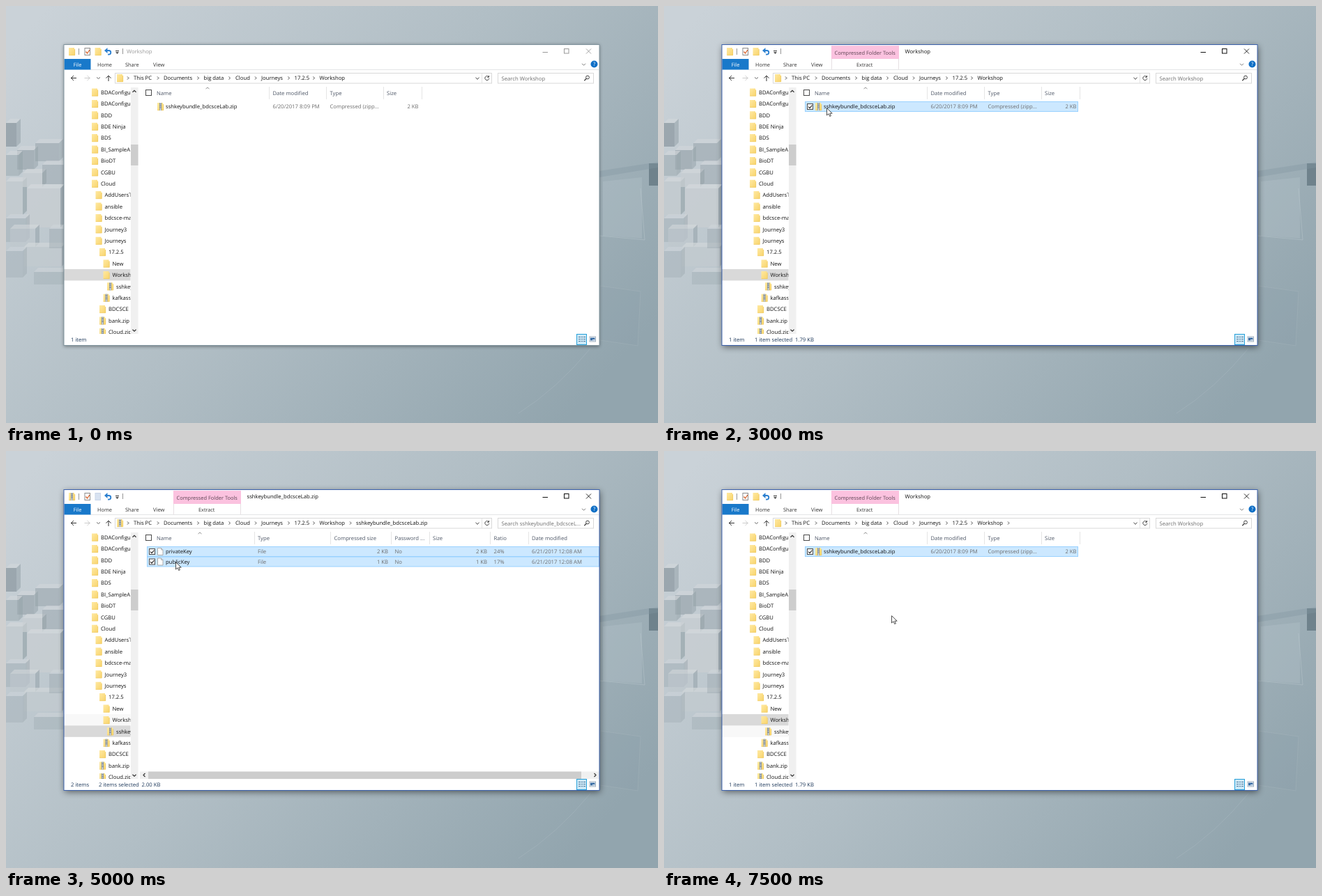
An HTML page that plays this animation: 935x599 px, repeating every 8000 ms.

```html
<!DOCTYPE html>
<html lang="en">
<head>
<meta charset="utf-8">
<title>File explorer</title>
<style>
  html, body { margin: 0; width: 100%; height: 100%; overflow: hidden; }
  svg { display: block; width: 935px; height: 599px; }
  text { font-family: "Open Sans", "Noto Sans", sans-serif; text-rendering: geometricPrecision; white-space: pre; }
</style>
</head>
<body>
<svg id="stage" viewBox="0 0 935 599" xmlns="http://www.w3.org/2000/svg">
  <defs>
    <linearGradient id="sky" gradientUnits="userSpaceOnUse" x1="60" y1="0" x2="760" y2="640">
      <stop offset="0" stop-color="#cad2d8"/>
      <stop offset=".5" stop-color="#b1bec5"/>
      <stop offset="1" stop-color="#92a5ae"/>
    </linearGradient>
    <linearGradient id="folder" x1="0" y1="0" x2="1" y2="1">
      <stop offset="0" stop-color="#ffe9a2"/>
      <stop offset="1" stop-color="#f8d46c"/>
    </linearGradient>
    <filter id="blurOn" x="-10%" y="-10%" width="120%" height="120%"><feGaussianBlur stdDeviation="5"/></filter>
    <filter id="blurOff" x="-10%" y="-10%" width="120%" height="120%"><feGaussianBlur stdDeviation="2.5"/></filter>
    <filter id="soft"><feGaussianBlur stdDeviation=".7"/></filter>
    <clipPath id="treeClip"><rect x="83" y="116" width="95.5" height="355"/></clipPath>
  </defs>
  <rect width="935" height="599" fill="url(#sky)"/>
  <g id="scenery" filter="url(#soft)"></g>
  <g id="window"></g>
  <path id="cursor" d="M.5 .7V11L3 8.8 4.7 12.5 6.4 11.8 4.8 8.2H8.2Z" fill="#fff" stroke="#222" stroke-width=".8"/>
</svg>
<script>
const LOOP = 8000;
const $ = id => document.getElementById(id);

// Drawing helpers
const rect = (x, y, w, h, fill, stroke) =>
  `<rect x="${x}" y="${y}" width="${w}" height="${h}" fill="${fill}"${stroke ? ` stroke="${stroke}"` : ''}/>`;
const line = (d, color = '#444', width = 1) =>
  `<path d="${d}" fill="none" stroke="${color}" stroke-width="${width}"/>`;
const text = (x, mid, str, color = '#111', size = 7.7, anchor = 'start') =>
  `<text x="${x}" y="${mid + 2.7}" fill="${color}" font-size="${size}" text-anchor="${anchor}">${str}</text>`;
const chevron = (x, y, dx, dy, color = '#444', width = 1) => dx
  ? line(`M${x - dx / 2} ${y - 2}l${dx} 2l${-dx} 2`, color, width)
  : line(`M${x - 2.5} ${y - dy / 2}l2.5 ${dy}l2.5 ${-dy}`, color, width);

const folder = (x, y, faded) => faded
  ? rect(x + .5, y + .5, 7.5, 10, '#d8e2f1', '#c9d5e8')
  : `<path d="M${x} ${y}h8v2h1v9h-9z" fill="url(#folder)"/>` +
    line(`M${x + .3} ${y + 10.7}h8.4V${y + 2}`, '#ecc65c', .6);
const zip = (x, y) => folder(x, y) + rect(x + 3, y, 3, 11, '#8d99a3') +
  line(`M${x + 4.5} ${y}v11`, '#e9eef2', 1) +
  line(`M${x + 3} ${y + 2}h3m-3 2.5h3m-3 2.5h3`, '#55626e', .7);
const page = (x, y) =>
  `<path d="M${x + .5} ${y + .5}h5l2.5 2.5v7.5h-7.5z" fill="#fff" stroke="#9a9a9a" stroke-width=".8"/>` +
  line(`M${x + 5.5} ${y + .5}v2.5h2.5`, '#9a9a9a', .7);
const checkbox = (x, y, on) => rect(x + .5, y + .5, 8, 8, '#fff', '#4a4a4a') +
  (on ? line(`M${x + 2} ${y + 4.6}l2 2l3.4 -4`, '#222', 1.1) : '');

function scenery() {
  // [x, y, width, height, shade, alpha]
  const cubes = [
    [0, 168, 15, 34, '#7f8d95', .6], [16, 207, 24, 28, '#8e9ba2', .55], [42, 197, 34, 26, '#93a0a7', .5],
    [0, 214, 18, 30, '#a1adb4', .6], [0, 252, 24, 48, '#c3cacf', .7], [24, 240, 28, 20, '#c8ced2', .7],
    [52, 228, 31, 28, '#9aa6ad', .5], [30, 262, 48, 56, '#c8ced2', .75], [0, 305, 28, 34, '#9eabb2', .45],
    [6, 320, 36, 26, '#c0c8cd', .6], [26, 346, 54, 28, '#c3cbcf', .65], [0, 352, 24, 38, '#a0adb3', .4],
    [40, 382, 42, 18, '#a3b0b6', .45], [62, 320, 21, 28, '#9da9b0', .45]
  ];
  const block = ([x, y, w, h, c, a]) => `<g opacity="${a}">` + rect(x, y, w, h, c) +
    `<path d="M${x} ${y}l6 -6h${w}l-6 6z" fill="#d3d8db"/>` +
    `<path d="M${x + w} ${y}l6 -6v${h}l-6 6z" fill="#98a5ac"/></g>`;
  const right = rect(922, 226, 13, 32, '#6f828c') +
    `<path d="M851 237L935 224V232L851 246Z" fill="#8295a0" opacity=".35"/>` +
    `<path d="M856 252L912 246V334L856 330Z" fill="#b2c0c7" opacity=".4"/>` +
    `<path d="M851 330L916 336L910 262" fill="none" stroke="#bac7cd" opacity=".5"/>` +
    `<path d="M852 402L910 410L906 488L852 480Z" fill="#8da0aa" opacity=".25" stroke="#b0bec5"/>`;
  const arcs = line('M735 585Q790 550 838 492', 'rgba(190,203,210,.25)', 1);
  return cubes.map(block).join('') + right + arcs;
}

const TREE = [
  [0, 'BDAConfigu'], [0, 'BDAConfigu'], [0, 'BDD'], [0, 'BDE Ninja'], [0, 'BDS'], [0, 'BI_SampleA'],
  [0, 'BioDT'], [0, 'CGBU'], [0, 'Cloud'], [1, 'AddUsersT'], [1, 'ansible'], [1, 'bdcsce-ma'],
  [1, 'Journey3'], [1, 'Journeys'], [2, '17.2.5'], [3, 'New'], [3, 'Worksho'], [4, 'sshkey', 1],
  [3, 'kafkassl', 1], [2, 'BDCSCE'], [2, 'bank.zip', 1], [2, 'Cloud.zip', 1]
];
const CRUMBS = [[183, 'This PC'], [226, 'Documents'], [283.5, 'big data'], [329, 'Cloud'],
  [366, 'Journeys'], [413.5, '17.2.5'], [449.5, 'Workshop']];
const CRUMB_ARROWS = [175, 218, 275.5, 320.5, 358, 405.5, 441.5];
const GREY = '#6d6d6d', HEAD = '#4d5666', NAVY = '#1e395b';
const BUNDLE = 'sshkeybundle_bdcsceLab.zip';

function tree(s) {
  const step = 16.4, rowY = i => 378 + (i - 16) * step;
  const mark = s.zip ? 17 : 16;
  let out = '<g clip-path="url(#treeClip)">';
  if (s.visited) out += rect(83, rowY(33 - mark), 96, step, '#f8f8f8');
  out += rect(83, rowY(mark), 96, step, '#d9d9d9');
  TREE.forEach(([level, name, packed], i) => {
    const y = 124 + i * step, x = 123 + level * 5.5;
    out += (packed ? zip : folder)(x, y - 5.5) + text(x + 13, y, name);
  });
  return out + '</g>' + rect(179, 117, 10.5, 354, '#f0f0f0') + rect(179, 199, 10.5, 30, '#cdcdcd') +
    chevron(184, 122.5, 0, -2.5, '#333', 1.2) + chevron(184, 466, 0, 2.5, '#333', 1.2);
}

function titleBar(s) {
  const ink = s.active ? '#111' : '#999';
  let out = (s.zipIcon ? zip : folder)(90, 60) + line('M104.5 61v9M167.5 61v8', '#8a8a8a', .9) +
    rect(113, 60.5, 7.5, 10, '#fff', '#8b8b8b') + line('M114.5 65.5l2 2.5l3.5 -5', '#d9622b', 1.3) +
    folder(127.5, 60, s.greyNew) +
    line('M143 64h4.5a2.8 2.8 0 0 1 0 5.6h-1.5', '#2a7fd0', 1.8) +
    '<path d="M141 64l4.5-4v8z" fill="#2a7fd0"/>' +
    line('M157 64.5h5', '#333', 1) + '<path d="M157 66.3h5l-2.5 2.5z" fill="#333"/>';
  if (s.active) {
    out += rect(240, 57, 97, 19, '#fbc2df') + line('M240.5 76v15.5M336.5 76v15.5', '#e6e0e3') +
      text(244.5, 67, 'Compressed Folder Tools', '#5d4353', 7.45) + text(276, 84, 'Extract', '#333', 7.3) +
      text(345.5, 65.5, s.zip ? BUNDLE : 'Workshop');
  } else {
    out += text(173, 65.5, 'Workshop', '#999');
  }
  out += line('M769.5 66.5h7.5', ink) + rect(800.5, 61.5, 6.5, 6.5, 'none', ink) +
    line('M832 61.5l7 7m0 -7l-7 7', ink, .9);
  return out;
}

function ribbon() {
  return line('M121 91.5H850', '#e4e5e6') + rect(83.5, 76, 38, 15.5, '#1979ca') +
    text(102.5, 84, 'File', '#fff', 7.4, 'middle') + text(131, 84, 'Home', '#333', 7.4) +
    text(171, 84, 'Share', '#333', 7.4) + text(211, 84, 'View', '#333', 7.6) +
    chevron(828.5, 84, 0, 2.5, '#777') +
    '<circle cx="843.5" cy="83.5" r="5" fill="#0f6fc6"/>' + text(843.5, 83.6, '?', '#fff', 7.5, 'middle');
}

function addressBar(s) {
  let out = line('M93 103.5h8m-4 -3.5l-3.7 3.5l3.7 3.5', '#333') +
    line('M112.5 103.5h8m-4 -3.5l3.7 3.5l-3.7 3.5', '#ccc') + chevron(132.5, 103.5, 0, 2, '#666') +
    line('M147 108v-8m-3.5 3.7l3.5 -3.7l3.5 3.7', '#333') +
    rect(156.5, 96.5, 540, 14.5, '#fff', '#d9d9d9') + line('M682.5 97v14', '#e2e2e2') +
    (s.zipIcon ? zip : folder)(159, 98);
  if (s.hover) {
    const [x, w, split] = s.hover;
    out += rect(x + .5, 97.5, w - 1, 13, '#e5f3ff', '#cfe8fb') + line(`M${x + split} 97v14`, '#cfe8fb');
  }
  CRUMB_ARROWS.forEach(x => out += chevron(x, 103.5, 2, 0));
  CRUMBS.forEach(([x, name]) => out += text(x, 103.3, name));
  if (s.zip || s.tailArrow) out += chevron(494, 103.5, 2, 0);
  if (s.zip) out += text(502, 103.3, BUNDLE);
  return out + chevron(676, 104, 0, 2.8) +
    line('M692 101.5a3 3 0 1 0 .8 2.5M692.5 100v2.3h-2.3', '#444') +
    rect(705.5, 96.5, 137, 14.5, '#fff', '#d9d9d9') +
    text(710.5, 103.8, s.zip ? 'Search sshkeybundle_bdcsceL...' : 'Search Workshop', GREY) +
    '<circle cx="834" cy="102.5" r="2.4" fill="none" stroke="#444"/>' + line('M832.3 104.3l-3 3', '#444', 1.3);
}

function header(columns, dividers, caret) {
  return checkbox(200, 120, false) + chevron(caret, 118, 0, -2, '#777', .8) +
    columns.map(([x, name]) => text(x, 125, name, HEAD)).join('') +
    line(dividers.map(x => `M${x + .5} 116v18`).join(''), '#e5e5e5');
}

// mode: 0 plain, 1 hovered, 2 selected
function row(y, right, mode, icon, cells) {
  let out = '';
  if (mode === 1) out += rect(202, y, right - 202, 14.5, '#e5f3ff');
  if (mode === 2) out += rect(202.5, y + .5, right - 203, 14, '#cce8ff', '#99d1ff');
  if (mode) out += checkbox(205, y + 3, mode === 2);
  out += icon(217, y + 2);
  cells.forEach(([x, str, anchor], i) => out += text(x, y + 7.5, str, i ? GREY : '#111', 7.7, anchor));
  return out;
}

function list(s) {
  if (!s.zip) {
    return header([[216, 'Name'], [382.5, 'Date modified'], [464.5, 'Type'], [546, 'Size']],
        [377, 459, 541, 596], 289) +
      row(137, 594, s.rows[0], zip, [[229, BUNDLE], [382.5, '6/20/2017 8:09 PM'],
        [464.5, 'Compressed (zipp...'], [591.5, '2 KB', 'end']]);
  }
  const keyRow = (y, mode, name, size, ratio) => row(y, 851, mode, page, [[229, name], [361, 'File'],
    [548, size, 'end'], [557.5, 'No'], [690, size, 'end'], [699.5, ratio], [754, '6/21/2017 12:08 AM']]);
  return header([[216, 'Name'], [361, 'Type'], [470.5, 'Compressed size'], [557.5, 'Password ...'],
      [612, 'Size'], [699.5, 'Ratio'], [754, 'Date modified']], [356, 465, 552, 607, 694, 749], 278) +
    keyRow(137, s.rows[0], 'privateKey', '2 KB', '24%') +
    keyRow(151.5, s.rows[1], 'publicKey', '1 KB', '17%') + scrollBar(s);
}

function scrollBar(s) {
  const thumb = rect(204, 460.5, 621, 10.5, '#cdcdcd');
  if (!s.arrows) return thumb;
  return rect(192, 460.5, 658.5, 10.5, '#f0f0f0') + thumb +
    line('M199.5 463l-2.5 2.5l2.5 2.5M843.5 463l2.5 2.5l-2.5 2.5', '#333', 1.2);
}

function statusBar(s) {
  const out = s.status.map(([x, str]) => text(x, 479.3, str, NAVY)).join('');
  return out + rect(818.5, 471.5, 14, 15, '#cbe8f6', '#26a0da') +
    line('M821 475.5h3m1 0h2m1 0h3M821 478.5h3m1 0h2m1 0h3M821 481.5h3m1 0h2m1 0h3', '#55789a', 1) +
    rect(837, 475, 8.5, 7, '#fff', '#9fb0bf') + rect(838, 476.5, 6.5, 4, '#3b6ea5') +
    line('M841 479.5h3.5', '#dfe9f2', 1);
}

function drawWindow(s) {
  const shadow = s.active
    ? '<rect x="84" y="58" width="768" height="432" fill="#000" opacity=".5" filter="url(#blurOn)"/>'
    : '<rect x="83" y="56" width="768" height="433" fill="#000" opacity=".4" filter="url(#blurOff)"/>';
  return shadow + rect(83, 55.5, 768, 432, '#fff') + titleBar(s) + ribbon() + addressBar(s) + tree(s) +
    list(s) + statusBar(s) + rect(83, 55.5, 768, 432, 'none', s.active ? '#3d62ad' : '#8296a0');
}

// Each step changes part of the state from its time on
const ONE = [[93, '1 item']], TWO = [[93, '2 items']];
const ONE_PICKED = [...ONE, [130, '1 item selected'], [188, '1.79 KB']];
const STEPS = [
  [0, { cursor: null, rows: [0, 0], status: ONE }],
  [1500, { cursor: [429, 230] }],
  [2000, { cursor: [259, 160] }],
  [2250, { cursor: [235, 152] }],
  [2500, { cursor: [233, 146], rows: [1, 0] }],
  [3000, { active: true, rows: [2, 0], status: ONE_PICKED }],
  [3250, { zip: true, visited: true, greyNew: true, rows: [0, 0] }],
  [3500, { zipIcon: true, arrows: true, rows: [1, 0], status: TWO }],
  [4000, { rows: [2, 0], status: [...TWO, [133, '1 item selected'], [191.5, '1.63 KB']] }],
  [5000, { cursor: [243, 159], rows: [2, 2], status: [...TWO, [133, '2 items selected'], [194.5, '2.00 KB']] }],
  [6000, { cursor: [421, 95], hover: [363, 48, 38] }],
  [6250, { cursor: [464, 100], hover: null }],
  [6500, { cursor: [470, 101], hover: [447, 52, 42] }],
  [7000, { zip: false, zipIcon: false, hover: null, rows: [0, 0], status: ONE }],
  [7250, { greyNew: false, rows: [2, 0], status: ONE_PICKED }],
  [7500, { cursor: [326, 236], tailArrow: true }]
];

let shown = -1;
function update(ms) {
  const t = ms % LOOP;
  const now = STEPS.filter(([at]) => at <= t);
  if (now.length === shown) return;
  shown = now.length;
  const s = Object.assign({}, ...now.map(([, change]) => change));
  $('window').innerHTML = drawWindow(s);
  $('cursor').setAttribute('visibility', s.cursor ? 'visible' : 'hidden');
  if (s.cursor) $('cursor').setAttribute('transform', `translate(${s.cursor})`);
}

$('scenery').innerHTML = scenery();
const start = performance.now();
function tick() {
  update(performance.now() - start);
  requestAnimationFrame(tick);
}
tick();
</script>
</body>
</html>
```
